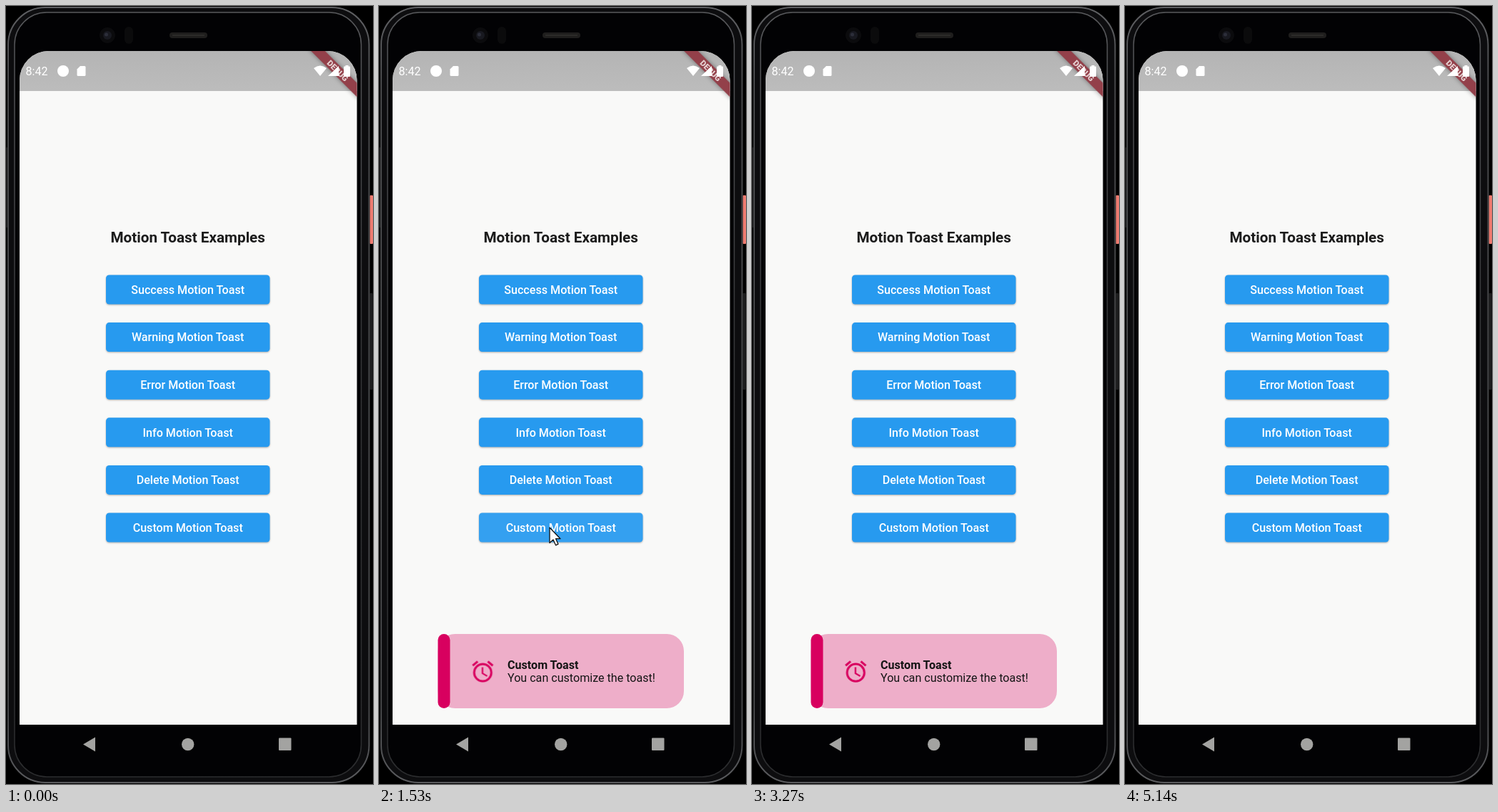
An HTML page for the animation above (5.18 s loop, 514x1089 px).

```html
<!DOCTYPE html>
<html lang="en">
<head>
<meta charset="utf-8">
<title>Motion Toast Examples</title>
<style>
  html, body { margin: 0; width: 100%; height: 100%; overflow: hidden; background: #000; }
  svg { display: block; width: 100%; height: 100%; }
  text { font-family: Roboto, sans-serif; font-size: 16.1px; }
  .mid { text-anchor: middle; }
  .title { font-size: 20.7px; font-weight: 700; fill: #1c1c1c; }
  .label { font-weight: 500; fill: #fff; }
  .face { fill: #279aef; filter: drop-shadow(0 1.6px 1.3px rgba(0, 0, 0, .3)); }
  .debug { font-size: 11.4px; font-weight: 900; fill: #e6d2d3; }

  #cursor, #ripple, #glow, #lift, #toast { animation: 5180ms linear infinite; }
  #cursor { animation-name: cursor; }
  #ripple { animation-name: ripple; transform-origin: 237px 731px; }
  #glow { animation-name: glow; }
  #lift { animation-name: lift; filter: drop-shadow(0 2.5px 2.5px rgba(0, 0, 0, .25)); }
  #toast { animation-name: toast; }
  #alarm {
    animation: pulse 1295ms -195ms infinite;
    transform-box: view-box;
    transform-origin: 145.3px 931.5px;
  }

  @keyframes cursor {
    0%, 12.5% { transform: translate(150px, 400px); visibility: hidden; }
    12.6% { transform: translate(150px, 400px); visibility: visible; animation-timing-function: ease-out; }
    20%, 37% { transform: none; visibility: visible; animation-timing-function: ease-in; }
    44% { transform: translate(150px, 400px); visibility: visible; }
    44.1%, 100% { transform: translate(150px, 400px); visibility: hidden; }
  }
  @keyframes ripple {
    0%, 21.2% { transform: scale(.12); opacity: 0; }
    21.8% { opacity: .06; }
    23.17% { transform: scale(1); opacity: .06; }
    27% { transform: scale(4.2); opacity: .06; }
    30%, 100% { transform: scale(4.2); opacity: 0; }
  }
  @keyframes glow {
    0%, 23.2% { opacity: 0; }
    26%, 29.5% { opacity: .06; }
    33%, 100% { opacity: 0; }
  }
  @keyframes lift {
    0%, 21.2% { opacity: 0; }
    23.2%, 26% { opacity: 1; }
    29%, 100% { opacity: 0; }
  }
  @keyframes toast {
    0%, 23.7% { transform: translateY(127px); visibility: hidden; }
    23.8% { transform: translateY(127px); visibility: visible; animation-timing-function: ease; }
    29.4% { transform: none; visibility: visible; }
    80.89% { transform: none; visibility: visible; animation-timing-function: cubic-bezier(.75, 0, .75, .9); }
    86.68% { transform: translateY(127px); visibility: visible; }
    86.7%, 100% { transform: translateY(127px); visibility: hidden; }
  }
  /* bounce-out between the small and the full icon size */
  @keyframes pulse {
    0% { transform: scale(.85); animation-timing-function: cubic-bezier(.33, 0, .67, .33); }
    36.36% { transform: scale(1); animation-timing-function: cubic-bezier(.33, .67, .67, 1); }
    54.55% { transform: scale(.9625); animation-timing-function: cubic-bezier(.33, 0, .67, .33); }
    72.73% { transform: scale(1); animation-timing-function: cubic-bezier(.33, .67, .67, 1); }
    81.82% { transform: scale(.9906); animation-timing-function: cubic-bezier(.33, 0, .67, .33); }
    90.91%, 100% { transform: scale(1); }
  }
</style>
</head>
<body>
<svg viewBox="0 0 514 1089" preserveAspectRatio="none">
  <defs>
    <clipPath id="app"><path d="M19 1006V104A41 41 0 0 1 60 63H450.500A41 41 0 0 1 491.500 104V1006Z"/></clipPath>
    <clipPath id="page"><rect x="19" y="119" width="472.5" height="887"/></clipPath>
    <clipPath id="pressed"><rect x="140" y="709.5" width="229.500" height="41" rx="4.6"/></clipPath>
    <linearGradient id="rim" x2="0" y2="1">
      <stop offset="0" stop-color="#606164"/>
      <stop offset=".1" stop-color="#47484a"/>
      <stop offset=".9" stop-color="#434446"/>
      <stop offset="1" stop-color="#5a5b5e"/>
    </linearGradient>
    <linearGradient id="bezel" x2="0" y2="1">
      <stop offset="0" stop-color="#58595c"/>
      <stop offset=".4" stop-color="#38393b"/>
      <stop offset="1" stop-color="#2c2d2f"/>
    </linearGradient>
    <linearGradient id="bar" x2="0" y2="1">
      <stop offset="0" stop-color="#b4b4b4"/>
      <stop offset="1" stop-color="#bcbcbc"/>
    </linearGradient>
  </defs>

  <!-- phone body -->
  <rect width="514" height="1089"/>
  <rect x="509.500" y="265" width="4.500" height="68" rx="1" fill="#ee7b70"/>
  <rect x="509.500" y="402" width="4" height="135" rx="1" fill="#1e1e1f"/>
  <path d="M1 198V310" stroke="#232324" stroke-width="1.500"/>
  <rect x="3" y="2" width="505.500" height="1085" rx="52" fill="#0d0d0f" stroke="url(#rim)" stroke-width="2"/>
  <rect x="12" y="9" width="485.500" height="1070" rx="45" fill="#020204" stroke="url(#bezel)" stroke-width="1.500"/>
  <circle cx="142" cy="41" r="11" fill="#0b0b0d"/>
  <circle cx="142" cy="41" r="6" fill="#181920"/>
  <circle cx="140.500" cy="40" r="2.5" fill="#2c2e3a"/>
  <rect x="166" y="29" width="12" height="24" rx="6" fill="#0b0b0c"/>
  <rect x="229" y="37" width="53" height="8" rx="4" fill="#1f1e1d"/>
  <path d="M233 41H278" stroke="#2c2b29" stroke-width="2"/>

  <!-- screen -->
  <g clip-path="url(#app)">
    <rect x="19" y="63" width="473" height="943" fill="#f9f9f8"/>
    <rect x="19" y="63" width="473" height="56" fill="url(#bar)"/>
    <g transform="translate(464.500 90.500) rotate(45)">
      <rect x="-50" y="-6.900" width="100" height="13.800" fill="#93404a"
            style="filter:drop-shadow(0 0 3px rgba(0,0,0,.4))"/>
      <text class="debug mid" y="4.100">DEBUG</text>
    </g>
    <g fill="#fff">
      <text x="27.500" y="97">8:42</text>
      <circle cx="80" cy="91" r="8"/>
      <path d="M104 84H110Q111.500 84 111.500 85.500V96.500Q111.500 98 110 98H101Q99.500 98 99.500 96.500V88.500Z"/>
      <path d="M431 87Q440 80 449 87L440 98Z"/>
      <path d="M466 84V98H451Z"/>
      <path d="M475.500 84.500V83H479.500V84.500H481Q482 84.500 482 85.500V98Q482 99 481 99H474Q473 99 473 98V85.500Q473 84.500 474 84.500Z"/>
    </g>
    <text class="title mid" x="254.700" y="330.500">Motion Toast Examples</text>
    <rect id="lift" x="140" y="709.5" width="229.500" height="41" rx="4.6" fill="#279aef"/>
    <g id="buttons"></g>
    <g clip-path="url(#pressed)" fill="#fff">
      <rect id="glow" x="140" y="709" width="230" height="42"/>
      <circle id="ripple" cx="237" cy="731" r="36"/>
    </g>
  </g>

  <g clip-path="url(#page)">
    <g id="toast">
      <rect x="82.500" y="879" width="344.500" height="104" rx="24" fill="#eeaec9"/>
      <rect x="82.500" y="879" width="17" height="104" rx="8.500" fill="#d8005f"/>
      <g id="alarm">
        <path transform="translate(145.300 931.500) scale(1.54) translate(-12 -11.930)" fill="#d8005f"
          d="M22 5.720l-4.600-3.860-1.290 1.530 4.600 3.860zM7.880 3.390L6.600 1.860 2 5.710l1.290 1.530zM12.500 8H11v6l4.750 2.850.75-1.230-4-2.370zM12 4a9 9 0 1 0 0 18a9 9 0 1 0 0-18zm0 16a7 7 0 1 1 0-14a7 7 0 1 1 0 14z"/>
      </g>
      <g fill="#151515">
        <text x="180" y="928" font-weight="700">Custom Toast</text>
        <text x="180" y="946.300">You can customize the toast!</text>
      </g>
    </g>
  </g>

  <!-- navigation bar -->
  <g fill="#a3a3a1">
    <path d="M108 1033.500L125 1023.500V1043.500Z"/>
    <circle cx="254.700" cy="1033.500" r="8.700"/>
    <rect x="382" y="1024.500" width="17.500" height="17.500" rx="1"/>
  </g>

  <path id="cursor" d="M239 730V751.500L244 747L247.500 754.800L251 753.200L247.600 745.700H254Z"
        fill="#fff" stroke="#111" stroke-width="1.300" stroke-linejoin="round"/>
</svg>
<script>
  const kinds = ['Success', 'Warning', 'Error', 'Info', 'Delete', 'Custom'];
  document.getElementById('buttons').innerHTML = kinds.map((kind, i) => {
    const y = 376.5 + i * 66.6;
    return `<rect class="face" x="140" y="${y}" width="229.5" height="41" rx="4.6"/>
      <text class="label mid" x="254.7" y="${y + 26.2}">${kind} Motion Toast</text>`;
  }).join('');
</script>
</body>
</html>
```
